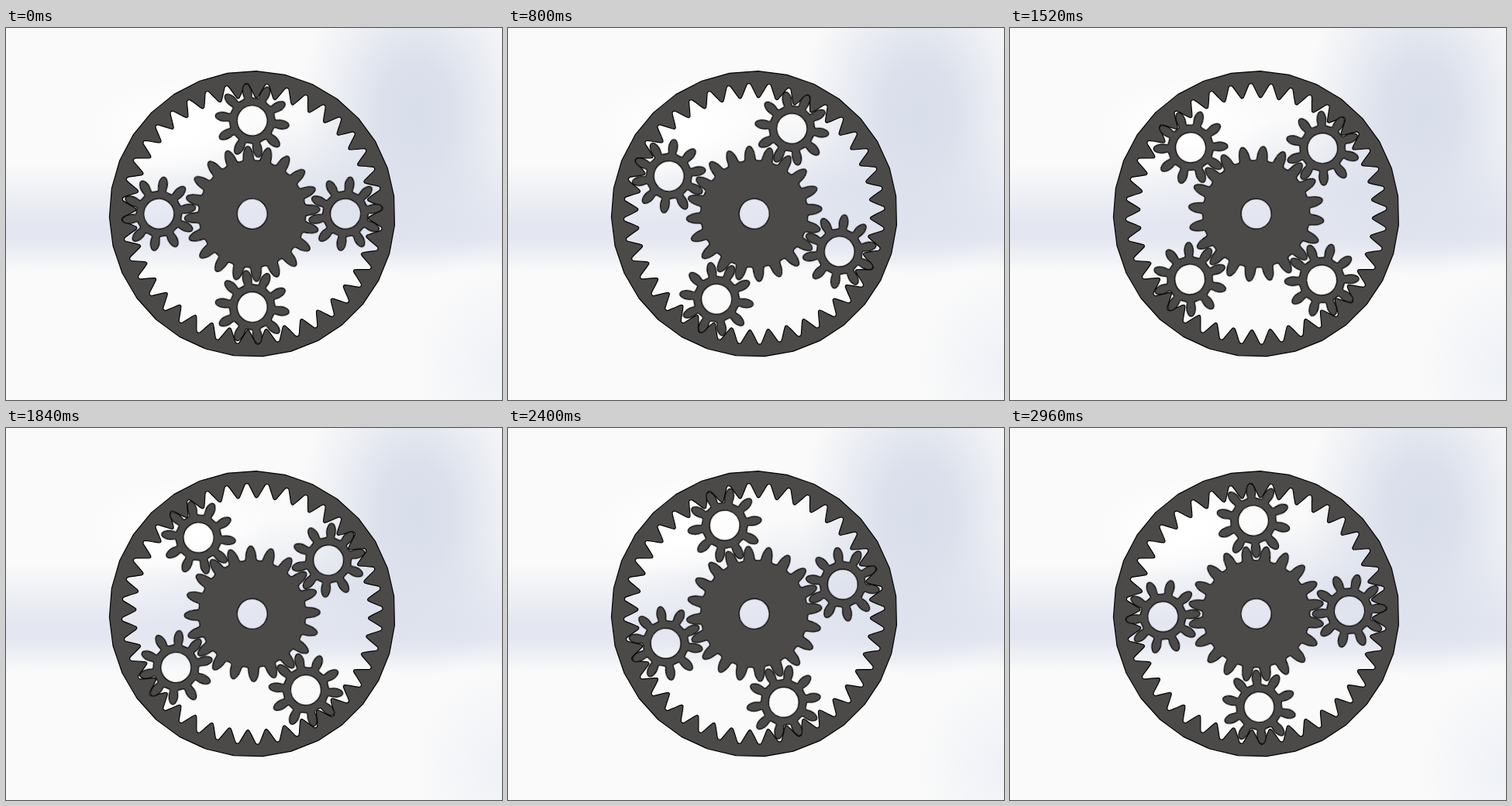
Animation of 640 by 480 pixels, one loop 3040 ms. Source, as an HTML page:

```html
<!DOCTYPE html>
<html lang="en">
<head>
<meta charset="utf-8">
<title>Planetary gear</title>
<style>
html, body { margin: 0; width: 100%; height: 100%; overflow: hidden; }
body {
  position: relative;
  background:
    radial-gradient(ellipse 120px 65px at 225px 130px, #fff 20%, #fff0),
    radial-gradient(ellipse 150px 215px at 530px 110px, #d9deeb, #dbe0ec 30%, #dce1ed00),
    radial-gradient(ellipse 290px 100px at 445px 212px, #dfe3ee, #dfe3ee00),
    radial-gradient(ellipse 110px 130px at 640px 440px, #eef1f7, #eef1f700),
    linear-gradient(#e4e7f100 175px, #e4e7f1aa 225px, #e4e7f1 250px, #e4e7f1 272px, #e4e7f100 315px),
    #fafafa;
}
svg { position: absolute; left: 0; top: 0; display: block; }
path { fill: #4b4a48; fill-rule: evenodd; stroke: #000; stroke-width: 1.2; stroke-linejoin: round; }
</style>
</head>
<body>
<svg width="640" height="480" viewBox="0 0 640 480">
  <g id="stage" transform="translate(317.7 239.8)"></g>
</svg>
<script>
const LOOP = 3040, STEPS = 38, SWEEP = 90.63;
const ORBIT = 120.3, BORE = 19.5;

const polar = (r, deg) => {
  const a = deg * Math.PI / 180;
  return [r * Math.sin(a), -r * Math.cos(a)];
};
const fmt = p => p.map(v => v.toFixed(2)).join(' ');
const circle = r => `M${r} 0A${r} ${r} 0 1 1 ${-r} 0A${r} ${r} 0 1 1 ${r} 0Z`;
const polygon = pts => 'M' + pts.map(fmt).join('L') + 'Z';

// closed curve through the midpoints of a control polygon
function smooth(pts) {
  const mid = (p, q) => [(p[0] + q[0]) / 2, (p[1] + q[1]) / 2];
  const n = pts.length;
  let d = 'M' + fmt(mid(pts[n - 1], pts[0]));
  pts.forEach((p, i) => { d += `Q${fmt(p)} ${fmt(mid(p, pts[(i + 1) % n]))}`; });
  return d + 'Z';
}

// profile: [radius, half width in px] from the root of a tooth to its tip
function teeth(count, profile, phase = 0) {
  const pts = [];
  for (let i = 0; i < count; i++) {
    const at = phase + i * 360 / count;
    const side = sign => profile.map(([r, w]) => polar(r, at + sign * w / r * 180 / Math.PI));
    pts.push(...side(-1), ...side(1).reverse());
  }
  return smooth(pts);
}

const rim = Array.from({ length: 31 }, (_, i) => polar(184.3, 1.6 + i * 360 / 31));
const ringTeeth = teeth(40, [[150, 11], [151.2, 9.9], [159, 6.2], [166.5, 2.9], [168.4, 1.5]], -2.4);
const sunTeeth = teeth(20, [[69, 8.6], [70, 6.8], [75, 6.6], [80, 5.8], [85, 3.7], [87.5, 1.5]]);
const planetTeeth = teeth(10, [[29.2, 6.4], [30, 4.4], [35, 5.7], [40, 5.8], [45, 4.2], [47.9, 1.7]]);

const stage = document.getElementById('stage');

function add(parent, tag, attrs = {}) {
  const el = document.createElementNS('http://www.w3.org/2000/svg', tag);
  for (const k in attrs) el.setAttribute(k, attrs[k]);
  return parent.appendChild(el);
}

function spin(el, from, turn) {
  el.animate(
    [{ transform: `rotate(${from}deg)` }, { transform: `rotate(${from + turn}deg)` }],
    { duration: LOOP, iterations: Infinity, easing: `steps(${STEPS}, end)` }
  ).startTime = 0;
}

add(stage, 'path', { d: polygon(rim) + ringTeeth });

const sun = add(stage, 'path', { d: sunTeeth + circle(BORE) });
spin(sun, -3.9, 3 * SWEEP);

const carrier = add(stage, 'g');
spin(carrier, 0, SWEEP);

for (let i = 0; i < 4; i++) {
  const arm = add(carrier, 'g', { transform: `rotate(${90 * i}) translate(0 ${-ORBIT})` });
  const planet = add(arm, 'path', { d: planetTeeth + circle(BORE) });
  spin(planet, -10.2, -4 * SWEEP);
}
</script>
</body>
</html>
```
